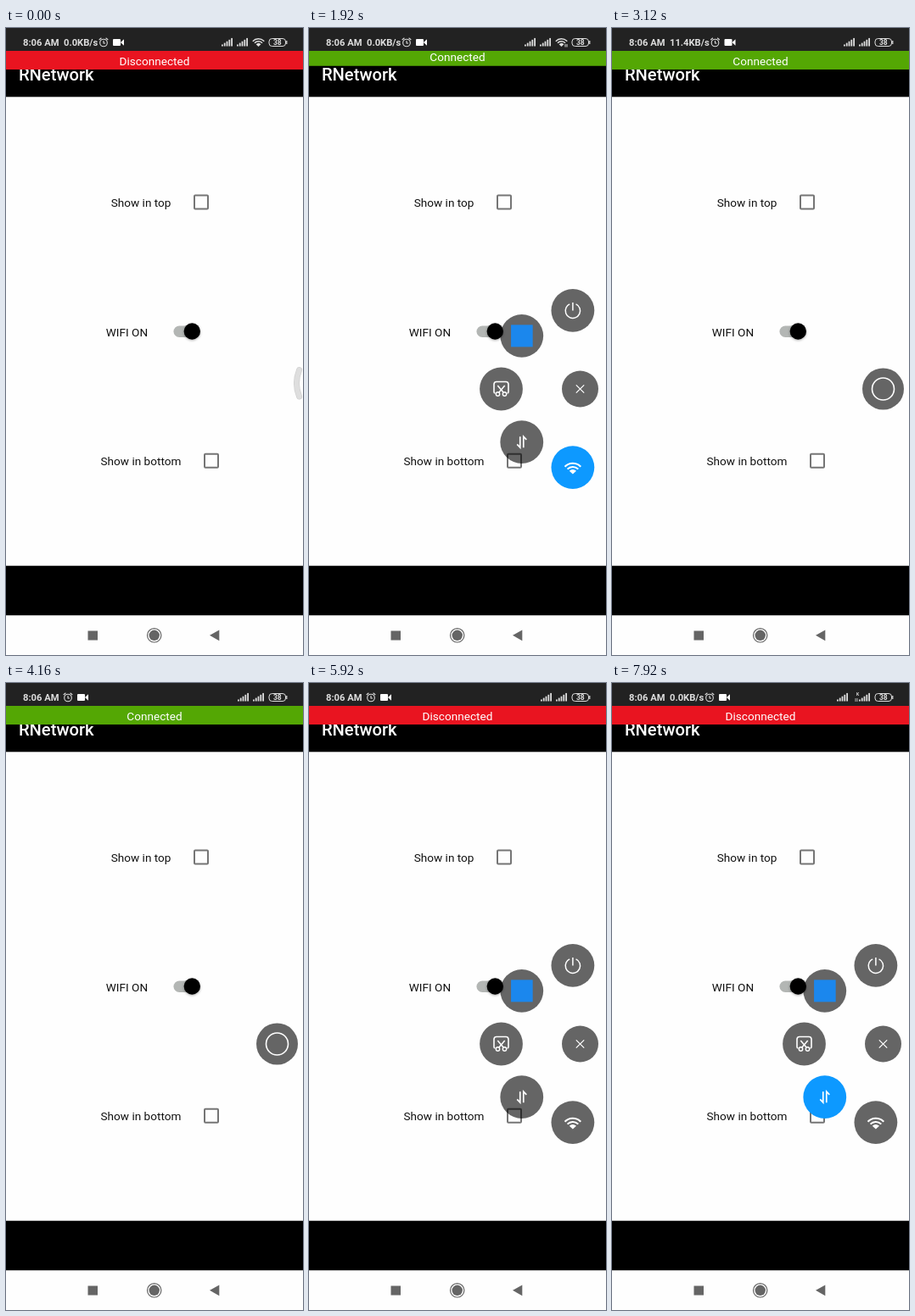
An HTML page with a canvas that plays this animation: 350x740 px, repeating every 8000 ms.

```html
<!DOCTYPE html>
<html lang="en">
<head>
<meta charset="utf-8">
<title>Network status demo</title>
<style>
  html, body { margin: 0; width: 100%; height: 100%; overflow: hidden; background: #fefefe; }
  canvas { display: block; width: 350px; height: 740px; }
</style>
</head>
<body>
<canvas id="stage"></canvas>
<script>
const LOOP = 8000;
const canvas = document.getElementById('stage');
const ctx = canvas.getContext('2d');
const dpr = window.devicePixelRatio || 1;
canvas.width = 350 * dpr;
canvas.height = 740 * dpr;

const GREY = 'rgba(0,0,0,.6)';
const BLUE = '#0d99ff';
const STATUS = '#dedede';
const CENTER = { x: 319.5, y: 426 };

const ramp = (t, start, length) => {
  const p = Math.min(1, Math.max(0, (t - start) / length));
  return p * p * (3 - 2 * p);
};
const mix = (a, b, p) => a + (b - a) * p;

function rect(x, y, w, h, color) {
  ctx.fillStyle = color;
  ctx.fillRect(x, y, w, h);
}

function disc(x, y, r, color) {
  ctx.fillStyle = color;
  ctx.beginPath();
  ctx.arc(x, y, r, 0, Math.PI * 2);
  ctx.fill();
}

function ring(x, y, r, width, color) {
  ctx.strokeStyle = color;
  ctx.lineWidth = width;
  ctx.beginPath();
  ctx.arc(x, y, r, 0, Math.PI * 2);
  ctx.stroke();
}

function roundBox(x, y, w, h, r) {
  ctx.beginPath();
  ctx.roundRect(x, y, w, h, r);
}

function text(str, x, y, size, color, weight = 400, align = 'left') {
  ctx.font = `${weight} ${size}px Roboto, sans-serif`;
  ctx.textAlign = align;
  ctx.fillStyle = color;
  ctx.fillText(str, x, y);
}

function lines(color, width, ...paths) {
  ctx.strokeStyle = color;
  ctx.lineWidth = width;
  ctx.beginPath();
  for (const [x, y, ...rest] of paths) {
    ctx.moveTo(x, y);
    for (let i = 0; i < rest.length; i += 2) ctx.lineTo(rest[i], rest[i + 1]);
  }
  ctx.stroke();
}

function polygon(color, x, y, ...rest) {
  ctx.fillStyle = color;
  ctx.beginPath();
  ctx.moveTo(x, y);
  for (let i = 0; i < rest.length; i += 2) ctx.lineTo(rest[i], rest[i + 1]);
  ctx.fill();
}

// Fan of arcs above the point (x, y)
function wifi(x, y, size, color) {
  ctx.strokeStyle = color;
  ctx.lineWidth = size * 0.145;
  for (const k of [0.92, 0.62]) {
    ctx.beginPath();
    ctx.arc(x, y, size * k, -Math.PI * 0.76, -Math.PI * 0.24);
    ctx.stroke();
  }
  ctx.fillStyle = color;
  ctx.beginPath();
  ctx.moveTo(x, y);
  ctx.arc(x, y, size * 0.4, -Math.PI * 0.76, -Math.PI * 0.24);
  ctx.fill();
}

function signal(x) {
  for (let i = 0; i < 5; i++) {
    const h = 2 + i * 1.9;
    rect(x + i * 2.8, 21.5 - h, 1.8, h, STATUS);
  }
}

function alarm(x, y) {
  ring(x, y + 0.5, 4.3, 1.1, STATUS);
  lines(STATUS, 1.1, [x, y - 2, x, y + 1, x + 2, y + 1],
    [x - 5.3, y - 3, x - 2.6, y - 5.2], [x + 5.3, y - 3, x + 2.6, y - 5.2]);
}

function camera(x, y) {
  ctx.fillStyle = '#fff';
  roundBox(x, y - 4, 9, 8, 1);
  ctx.fill();
  polygon('#fff', x + 9, y, x + 13, y - 3.7, x + 13, y + 3.7);
}

function statusBar(t) {
  rect(0, 0, 350, 27, '#222');
  text('8:06 AM', 20, 21, 11.2, STATUS, 700);

  const speed = t < 2400 ? '0.0KB/s' : t < 3800 ? '11.4KB/s' : t < 7400 ? '' : '0.0KB/s';
  if (speed) text(speed, 68, 21, 11.2, STATUS, 700);
  const iconX = speed === '' ? 73 : speed.length > 7 ? 121.5 : 115;
  alarm(iconX, 17);
  camera(iconX + 11, 17);

  const online = t < 2400;
  const mobile = t >= 7000;
  const left = online ? 254 : mobile ? 265 : 273;
  signal(left);
  signal(online ? 272 : 291);
  if (online) {
    wifi(297.5, 22, 10, STATUS);
    if (t >= 960) lines(STATUS, 1, [302, 19, 302, 22.5], [304, 19, 304, 22.5]);
  }
  if (mobile) {
    text('K', 288, 15, 5, STATUS, 700);
    lines(STATUS, 0.8, [287, 18, 287, 22], [289, 18, 289, 22]);
  }

  ctx.strokeStyle = STATUS;
  ctx.lineWidth = 1;
  roundBox(310, 12.5, 19.5, 9, 3.5);
  ctx.stroke();
  rect(330.2, 15, 1.2, 4, STATUS);
  text('38', 319.8, 20.2, 8.5, STATUS, 700, 'center');
}

function banner(t) {
  const swaps = [[1060, 1560], [4400, 5160]];
  let shown = 1;
  for (const [hide, show] of swaps) {
    if (t >= hide) shown = t < show ? 1 - ramp(t, hide, 480) : ramp(t, show, 500);
  }
  if (shown <= 0) return;
  const connected = t >= 1560 && t < 5160;
  const dy = -22.5 * (1 - shown);
  ctx.save();
  ctx.beginPath();
  ctx.rect(0, 27, 350, 54);
  ctx.clip();
  rect(0, 26.5 + dy, 350, 22.5, connected ? '#54a704' : '#e91420');
  text(connected ? 'Connected' : 'Disconnected', 175, 43.5 + dy, 13.6, '#fff', 400, 'center');
  ctx.restore();
}

function checkbox(x, y) {
  ctx.strokeStyle = '#757575';
  ctx.lineWidth = 2;
  roundBox(x - 8, y - 8, 16, 16, 1);
  ctx.stroke();
}

function toggle() {
  ctx.fillStyle = '#b3b6b4';
  roundBox(197.5, 351.5, 29, 13.5, 6.75);
  ctx.fill();
  ctx.save();
  ctx.shadowColor = 'rgba(0,0,0,.35)';
  ctx.shadowBlur = 3 * dpr;
  ctx.shadowOffsetY = dpr;
  disc(219.3, 358, 9.7, '#000');
  ctx.restore();
}

function page() {
  rect(0, 0, 350, 740, '#fefefe');
  rect(0, 27, 350, 54.3, '#000');
  text('RNetwork', 14.9, 62, 20.2, '#fff', 500);
  text('Show in top', 123.7, 211, 13.6, '#111');
  checkbox(230, 205.5);
  text('WIFI ON', 117.7, 364, 13.6, '#111');
  toggle();
  text('Show in bottom', 111.5, 516, 13.6, '#111');
  checkbox(242, 510.7);
  rect(0, 634.7, 350, 58.5, '#000');
  rect(96.5, 711.5, 11.5, 11, '#656565');
  ring(174.7, 716.8, 8.2, 1.2, '#656565');
  disc(174.7, 716.8, 6.2, '#656565');
  polygon('#656565', 240, 716.8, 251.3, 710.5, 251.3, 723.2);
}

// Icons are drawn around the origin
const icons = [
  function power() {
    ctx.strokeStyle = '#fff';
    ctx.lineWidth = 1.5;
    ctx.beginPath();
    ctx.arc(0, 0.3, 8.7, -Math.PI * 0.36, Math.PI * 1.36);
    ctx.stroke();
    lines('#fff', 1.5, [0, -9.3, 0, 0]);
  },
  function app() {
    rect(-12.7, -13, 25.6, 26, '#1b87ed');
  },
  function snip() {
    lines('#fff', 1.5, [-4.2, -4, 3, 4.5], [4.2, -4, -3, 4.5]);
    ring(-4, 6, 2.2, 1.4, '#fff');
    ring(4, 6, 2.2, 1.4, '#fff');
    ctx.lineWidth = 1.6;
    ctx.beginPath();
    ctx.moveTo(-7.5, 5);
    ctx.arcTo(-8.5, 5, -8.5, 0, 1.5);
    ctx.arcTo(-8.5, -8.5, 0, -8.5, 3);
    ctx.arcTo(8.5, -8.5, 8.5, 0, 3);
    ctx.arcTo(8.5, 5, 7.5, 5, 1.5);
    ctx.stroke();
  },
  function data() {
    lines('#fff', 1.7, [-2, -6.5, -2, 6.5, -5.5, 2.8], [2, 6.5, 2, -6.5, 5.5, -2.8]);
  },
  function wireless() {
    wifi(0, 8, 14, '#fff');
  }
];

function floatingMenu(t) {
  const closing = ramp(t, 2720, 180);
  const open = ramp(t, 880, 160) - closing + ramp(t, 4540, 200);
  const cross = ramp(t, 920, 200) - closing + ramp(t, 4580, 240);
  const ball = ramp(t, 480, 160);

  if (ball < 1) {
    ctx.save();
    ctx.globalAlpha = 1 - ball;
    ctx.lineCap = 'round';
    for (const [width, color] of [[7, '#cfcfcf'], [5.6, '#dedede']]) {
      ctx.strokeStyle = color;
      ctx.lineWidth = width;
      ctx.beginPath();
      ctx.moveTo(345.6, 403.5);
      ctx.quadraticCurveTo(339.3, 419.3, 345.6, 435);
      ctx.stroke();
    }
    ctx.restore();
  }

  if (open > 0) {
    const wifiOn = t < 2400;
    const dataOn = t >= 6500;
    icons.forEach((icon, i) => {
      const angle = Math.PI + (2 - i) * 0.739;
      const on = (i === 4 && wifiOn) || (i === 3 && dataOn);
      ctx.save();
      ctx.globalAlpha = open;
      ctx.translate(CENTER.x + Math.cos(angle) * 93 * open, CENTER.y + Math.sin(angle) * 93 * open);
      ctx.scale(open, open);
      disc(0, 0, 25.4, on ? BLUE : GREY);
      icon();
      ctx.restore();
    });
  }

  if (ball > 0) {
    ctx.save();
    ctx.globalAlpha = ball;
    ctx.translate(CENTER.x + 24 * (1 - ball), CENTER.y);
    disc(0, 0, mix(24.5, 21.5, open), GREY);
    if (open < 1) {
      ctx.globalAlpha = ball * (1 - open);
      ring(0, 0, 13, 1.6, '#fff');
    }
    if (cross > 0) {
      const s = 4.7 * cross;
      ctx.globalAlpha = 1;
      lines('#fff', 1.2, [-s, -s, s, s], [s, -s, -s, s]);
    }
    ctx.restore();
  }
}

function draw(now) {
  const t = now % LOOP;
  ctx.setTransform(dpr, 0, 0, dpr, 0, 0);
  page();
  banner(t);
  statusBar(t);
  floatingMenu(t);
}

const start = performance.now();
function tick() {
  draw(performance.now() - start);
  requestAnimationFrame(tick);
}
tick();
</script>
</body>
</html>
```
